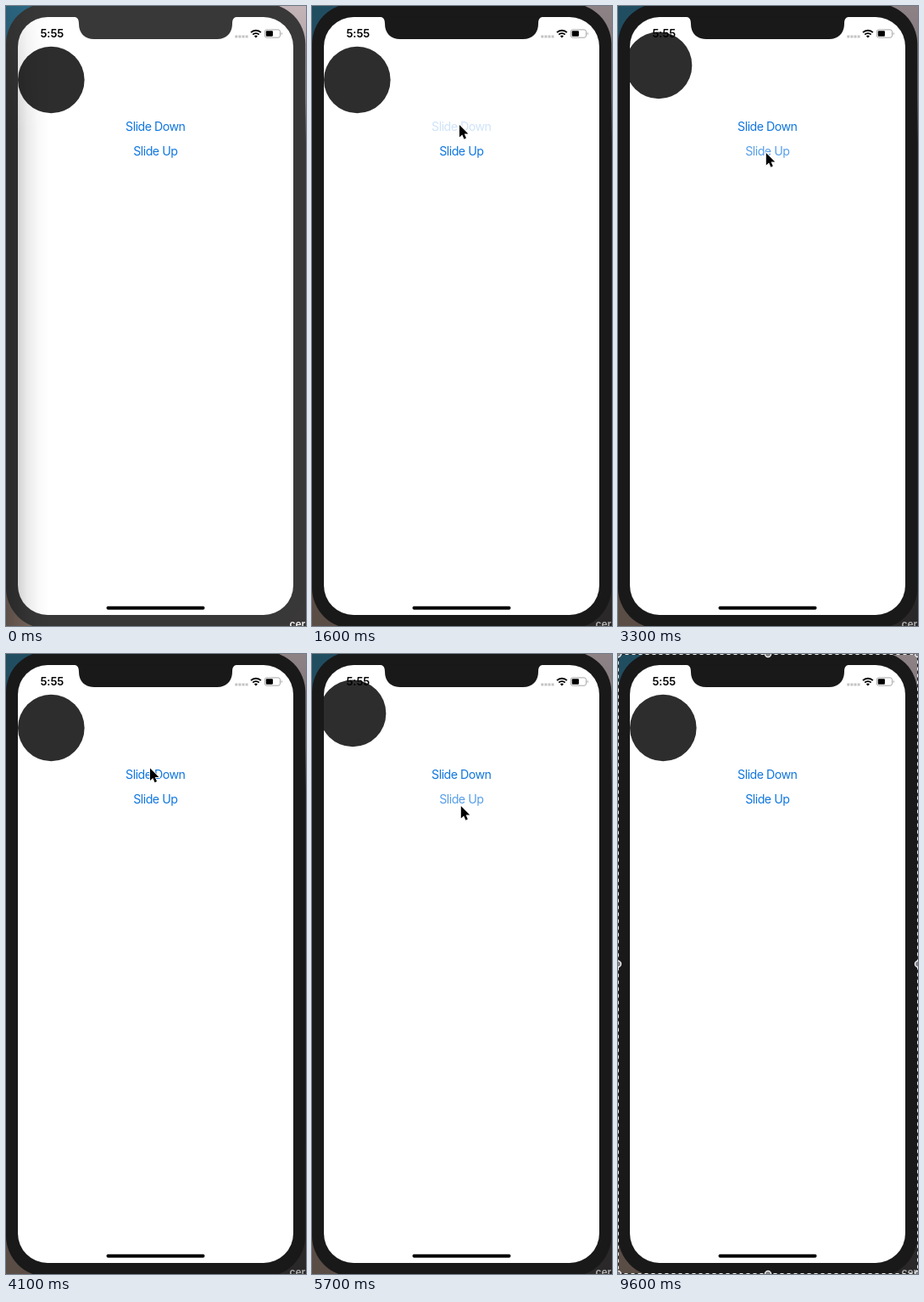
Animation of 354 by 730 pixels, one loop 9700 ms. Source, as an HTML page:

```html
<!DOCTYPE html>
<html lang="en">
<head>
<meta charset="utf-8">
<title>Spring slide</title>
<style>
  html, body { margin: 0; width: 100%; height: 100%; overflow: hidden; background: #333; }
  svg { display: block; width: 354px; height: 730px; }
  text { font-family: Inter, "Liberation Sans", sans-serif; }
  .button { font-size: 14.2px; letter-spacing: -.5px; fill: #0f76df; text-anchor: middle; }
  .clock { font-size: 13px; font-weight: 600; letter-spacing: -.1px; }
  .handle circle { fill: #85858a; stroke: #fff; stroke-width: 1.2; }
</style>
</head>
<body>
<svg viewBox="0 0 354 730">
  <defs>
    <clipPath id="screenClip"><rect x="14" y="13" width="325" height="704" rx="35"/></clipPath>
    <linearGradient id="sideShade">
      <stop offset="0" stop-color="#000" stop-opacity=".25"/>
      <stop offset=".28" stop-color="#000" stop-opacity=".17"/>
      <stop offset=".5" stop-color="#000" stop-opacity=".08"/>
      <stop offset=".75" stop-color="#000" stop-opacity=".025"/>
      <stop offset="1" stop-color="#000" stop-opacity="0"/>
    </linearGradient>
    <linearGradient id="fadeTop" x2="0" y2="1">
      <stop offset="0" stop-color="#555"/>
      <stop offset=".2" stop-color="#fff"/>
    </linearGradient>
    <mask id="shadeMask"><rect width="60" height="730" fill="url(#fadeTop)"/></mask>
    <linearGradient id="rightEdge" x2="0" y2="1">
      <stop offset="0" stop-color="#c4b4b8"/>
      <stop offset=".15" stop-color="#a0989c"/>
      <stop offset=".22" stop-color="#3c3c40"/>
      <stop offset="1" stop-color="#3a3838"/>
    </linearGradient>
  </defs>

  <g id="desktop">
    <rect width="177" height="365" fill="#2d6a86"/>
    <rect y="365" width="177" height="365" fill="#7c6a61"/>
    <rect x="177" width="177" height="730" fill="url(#rightEdge)"/>
    <text x="334.5" y="731.5" font-size="12" font-weight="600" fill="#f2f2f2">cer</text>
    <rect id="windowShadow" width="354" height="730" opacity=".28"/>
  </g>

  <rect id="bezel" x="0" y="-3" width="353.3" height="736" rx="48"/>
  <g clip-path="url(#screenClip)">
    <rect x="14" y="13" width="325" height="704" fill="#fff"/>
    <circle id="ball" r="39.3" fill="#2d2d2d"/>
    <text id="down" class="button" x="176.3" y="146.5">Slide Down</text>
    <text id="up" class="button" x="176.3" y="176">Slide Up</text>
  </g>
  <path id="notch" d="M79 12.5C84 13 86 15 86 21C86 32 93 39 104 39H249C260 39 267 32 267 21C267 15 269 13 274 12.5Z"/>

  <text class="clock" x="40.5" y="37.4">5:55</text>
  <path d="M270.3 36H285.5" stroke="#c3c3c3" stroke-width="2.8" stroke-dasharray="3 1.1"/>
  <g fill="none" stroke="#000" stroke-width="1.9">
    <path d="M289 31.1A8.4 8.4 0 0 1 300.8 31.1"/>
    <path d="M291.2 33.7A5.2 5.2 0 0 1 298.6 33.7"/>
  </g>
  <path d="M292.9 35.4A2.9 2.9 0 0 1 296.9 35.4L294.9 37.5Z"/>
  <rect x="305.3" y="27.9" width="18.2" height="9.3" rx="2.4" fill="none" stroke="#a6a6a6"/>
  <rect x="306.7" y="29.3" width="8.2" height="6.5" rx="1"/>
  <path d="M324.8 31A1.7 1.7 0 0 1 324.8 34.2Z" fill="#a6a6a6"/>
  <rect x="118.5" y="706.7" width="116" height="4" rx="2"/>

  <rect id="shade" width="51" height="730" fill="url(#sideShade)" mask="url(#shadeMask)"/>

  <g id="selection">
    <rect x=".5" y=".5" width="353" height="729" fill="none" stroke="#222"/>
    <rect x=".5" y=".5" width="353" height="729" fill="none" stroke="#e8e8e8" stroke-dasharray="4 4"/>
    <g class="handle" id="handles"></g>
  </g>

  <path id="cursor" d="M0 0V14.6L3.3 11.5L5.6 16.7L8 15.6L5.8 10.6H10.4Z" stroke="#fff" stroke-width="1.6" paint-order="stroke"/>
</svg>
<script>
  const LOOP = 9700, STEP = 100;
  const ACTIVATE = 1500, SELECT = 7900;
  const TOP = [53.3, 87], BOTTOM = [221.2, 633.8];
  const taps = [
    { at: 1600, button: "down" },
    { at: 3050, button: "up" },
    { at: 4250, button: "down" },
    { at: 5450, button: "up" }
  ];
  // time, x, y of the pointer tip
  const pointer = [
    [100, -14, 300], [1000, 175, 139.5], [1400, 174.8, 140.5], [2000, 171.5, 138.5],
    [2400, 174.8, 173], [3500, 174.8, 173], [3950, 170, 134.5], [4600, 170, 134.5],
    [5200, 175.8, 179], [5900, 175.8, 179], [6300, 102, 268], [6400, 102, 268],
    [6700, 62, 290], [6800, 62, 290], [7200, -14, 310]
  ];
  const el = id => document.getElementById(id);
  const show = (id, on) => el(id).style.display = on ? "" : "none";
  const mix = (a, b, k) => a + (b - a) * k;
  const move = (id, x, y) => el(id).setAttribute("transform", `translate(${x} ${y})`);

  for (const x of [0, 177, 354])
    for (const y of [0, 365, 730])
      if (x !== 177 || y !== 365)
        el("handles").innerHTML += `<circle cx="${x}" cy="${y}" r="3.6"/>`;

  function spring(s) {
    const decay = 14, freq = 12.7;
    return 1 - Math.exp(-decay * s) * (Math.cos(freq * s) + decay / freq * Math.sin(freq * s));
  }

  function ballAt(t) {
    const tap = taps.filter(p => p.at <= t).pop();
    if (!tap) return TOP;
    const k = t - tap.at > 900 ? 1 : spring((t - tap.at) / 1000);
    const [from, to] = tap.button === "down" ? [TOP, BOTTOM] : [BOTTOM, TOP];
    return from.map((v, i) => mix(v, to[i], k));
  }

  function buttonAlpha(name, t) {
    const tap = taps.find(p => p.button === name && t >= p.at - 40 && t < p.at + 400);
    return tap ? mix(.2, 1, Math.max(0, t - tap.at) / 400) : 1;
  }

  function pointerAt(t) {
    const i = pointer.findIndex(p => p[0] > t);
    if (i < 1) return null;
    const a = pointer[i - 1], b = pointer[i];
    const u = (t - a[0]) / (b[0] - a[0]), k = u * u * (3 - 2 * u);
    return [mix(a[1], b[1], k), mix(a[2], b[2], k)];
  }

  function draw(t) {
    const active = t >= ACTIVATE;
    for (const id of ["bezel", "notch"]) el(id).setAttribute("fill", active ? "#191919" : "#383838");
    show("shade", !active);
    show("windowShadow", active);
    show("selection", t >= SELECT);
    move("ball", ...ballAt(t));
    for (const id of ["down", "up"]) el(id).style.opacity = buttonAlpha(id, t);
    const tip = pointerAt(t);
    show("cursor", tip);
    if (tip) move("cursor", ...tip);
  }

  const start = performance.now();
  function tick() {
    const t = (performance.now() - start) % LOOP;
    draw(Math.floor(t / STEP) * STEP); // ten pictures a second
    requestAnimationFrame(tick);
  }
  tick();
</script>
</body>
</html>
```
